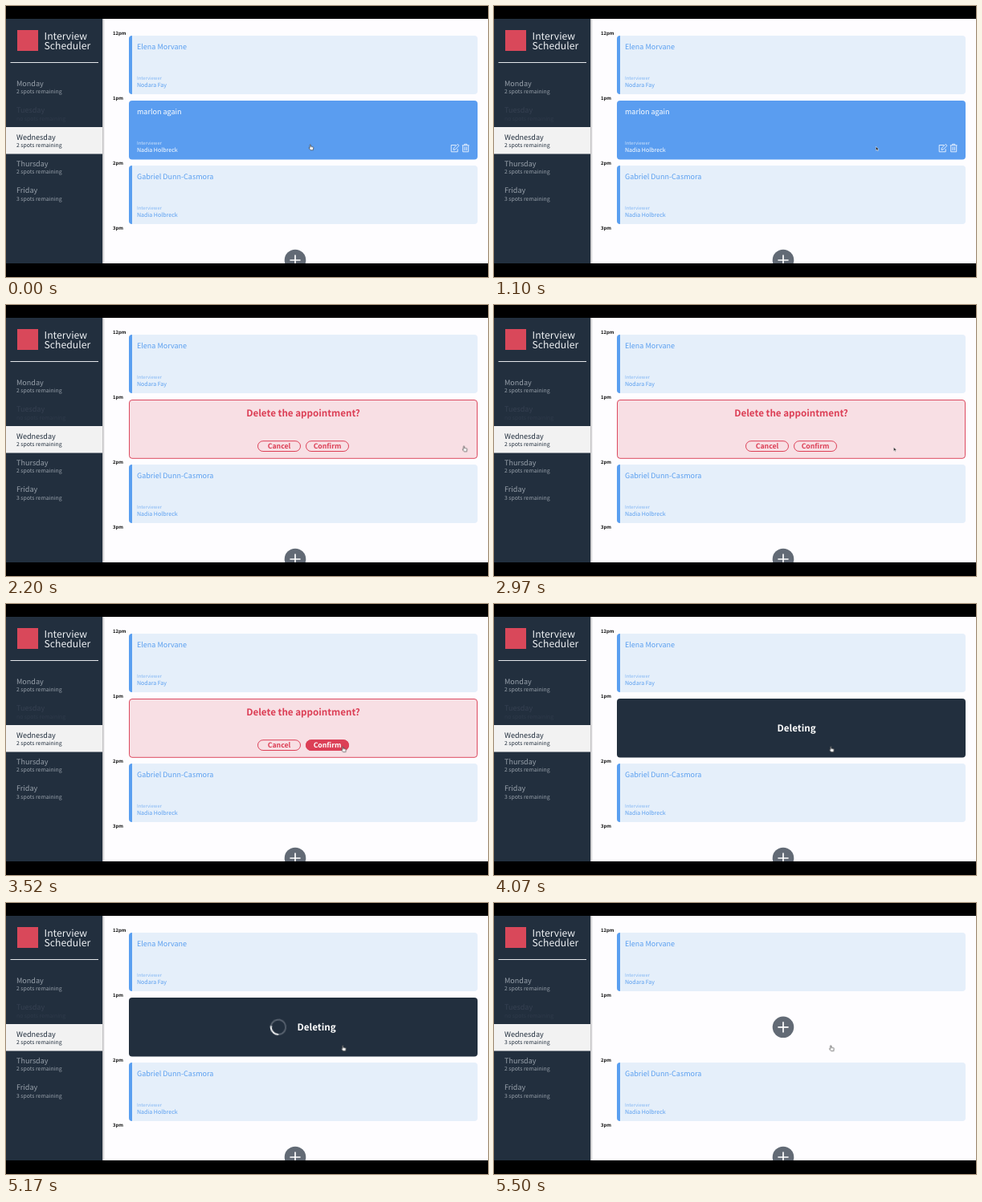
An HTML page for the animation above (5.61 s loop, 600x338 px).

```html
<!DOCTYPE html>
<html lang="en">
<head>
<meta charset="utf-8">
<title>Interview Scheduler</title>
<style>
  html, body { margin: 0; width: 100%; height: 100%; overflow: hidden; background: #000; }
  svg { display: block; width: 100vw; height: 100vh; }
  text {
    font-family: "Noto Sans CJK JP", "Noto Sans CJK SC", "Noto Sans", sans-serif;
    text-rendering: geometricPrecision;
    white-space: pre;
  }
  .title { font-size: 12.2px; font-weight: 300; fill: #eef1f4; }
  .days { fill: #98a1ab; }
  .day { font-size: 9.05px; }
  .spots { font-size: 6.85px; }
  .full { fill: #364152; }
  .current { fill: #222f3e; }
  .hour { font-size: 5.9px; font-weight: 700; fill: #111; }
  .name { font-size: 9px; }
  .label { font-size: 5.8px; opacity: .7; }
  .host { font-size: 7.04px; }
  .head { font-size: 11.6px; font-weight: 700; }
  .button { font-size: 8.7px; font-weight: 700; }
  .mid { text-anchor: middle; }
  .blue { fill: #5a9ff0; }
  .white { fill: #fff; }
  .red { fill: #dc3f56; }

  /* one loop is 51 ticks of 110 ms */
  .anim { animation: 5610ms step-end infinite; }
  .booked { animation-name: booked; }
  .confirm { animation-name: confirm; }
  .hover { animation-name: hover; }
  .deleting { animation-name: deleting; }
  .bare { animation-name: bare; }
  .loading { animation-name: loading; }
  .empty { animation-name: empty; }
  .before { animation-name: before; }
  .hand { animation-name: hand; }
  .arrow { animation-name: arrow; }
  .spin {
    transform-origin: 339px 154.8px;
    animation: spin 5610ms steps(51) infinite;
  }
  .cursor { animation: move 5610ms infinite; }

  @keyframes booked { 0% { visibility: visible } 35.29%, 100% { visibility: hidden } }
  @keyframes confirm { 0% { visibility: hidden } 35.29% { visibility: visible } 72.54%, 100% { visibility: hidden } }
  @keyframes hover { 0% { visibility: hidden } 56.86% { visibility: visible } 72.54%, 100% { visibility: hidden } }
  @keyframes deleting { 0% { visibility: hidden } 72.54% { visibility: visible } 94.11%, 100% { visibility: hidden } }
  @keyframes bare { 0% { visibility: hidden } 72.54% { visibility: visible } 74.5%, 100% { visibility: hidden } }
  @keyframes loading { 0% { visibility: hidden } 74.5% { visibility: visible } 94.11%, 100% { visibility: hidden } }
  @keyframes empty { 0% { visibility: hidden } 94.11%, 100% { visibility: visible } }
  @keyframes before { 0% { visibility: visible } 94.11%, 100% { visibility: hidden } }
  @keyframes hand {
    0% { visibility: visible } 1.96% { visibility: hidden }
    31.37% { visibility: visible } 50.98% { visibility: hidden }
    56.86%, 100% { visibility: visible }
  }
  @keyframes arrow {
    0% { visibility: hidden } 1.96% { visibility: visible }
    31.37% { visibility: hidden } 50.98% { visibility: visible }
    56.86%, 100% { visibility: hidden }
  }
  @keyframes spin { to { transform: rotate(2040deg) } }
  @keyframes move {
    0% { transform: translate(380px, 176.3px); animation-timing-function: step-end }
    1.96% { transform: translate(380px, 176.3px); animation-timing-function: steps(4, start) }
    9.8% { transform: translate(430px, 177px); animation-timing-function: step-end }
    13.72% { transform: translate(430px, 177px); animation-timing-function: steps(4, start) }
    21.56% { transform: translate(477px, 178px); animation-timing-function: step-end }
    23.52% { transform: translate(477px, 178px); animation-timing-function: steps(6, start) }
    35.29% { transform: translate(571.2px, 179.4px); animation-timing-function: step-end }
    50.98% { transform: translate(571.2px, 179.4px); animation-timing-function: steps(5, start) }
    60.78% { transform: translate(391px, 181.2px); animation-timing-function: step-end }
    62.74%, 100% { transform: translate(420.5px, 181.2px); animation-timing-function: step-end }
  }
</style>
</head>
<body>
<svg viewBox="0 0 600 338" preserveAspectRatio="none">
  <defs>
    <clipPath id="page"><rect y="16" width="600" height="305"/></clipPath>
    <linearGradient id="shade">
      <stop offset="0" stop-color="#000" stop-opacity=".28"/>
      <stop offset="1" stop-color="#000" stop-opacity="0"/>
    </linearGradient>
    <g id="card">
      <rect width="434" height="73" rx="4" fill="#e5effa"/>
      <path d="M4 0V73A4 4 0 0 1 0 69V4A4 4 0 0 1 4 0Z" fill="#5a9ff0"/>
    </g>
    <g id="add">
      <circle r="13.3" fill="#626a75"/>
      <path d="M-6.6 0H6.6M0-6.6V6.6" stroke="#fff" stroke-width="1.7"/>
    </g>
  </defs>

  <g clip-path="url(#page)">
    <rect y="16" width="600" height="305" fill="#fefdff"/>
    <rect x="120" y="16" width="3" height="305" fill="url(#shade)"/>
    <rect y="16" width="120" height="305" fill="#222f3e"/>

    <rect x="14" y="30" width="26" height="26" fill="#d9485a"/>
    <text class="title" x="47.6" y="42.2">Interview</text>
    <text class="title" x="47.6" y="54.2">Scheduler</text>
    <path d="M5.5 70.5H115" stroke="#e4e7ea"/>

    <rect y="151" width="120" height="33.5" fill="#f2f2f2"/>
    <g class="days">
      <text class="day" x="13" y="100.1">Monday</text>
      <text class="spots" x="13" y="109.1">2 spots remaining</text>
      <g class="full">
        <text class="day" x="13" y="133.4">Tuesday</text>
        <text class="spots" x="13" y="142.5" opacity=".6">no spots remaining</text>
      </g>
      <g class="current">
        <text class="day" x="13" y="166.6">Wednesday</text>
        <text class="spots anim before" x="13" y="176">2 spots remaining</text>
        <text class="spots anim empty" x="13" y="176">3 spots remaining</text>
      </g>
      <text class="day" x="13" y="200">Thursday</text>
      <text class="spots" x="13" y="209.3">2 spots remaining</text>
      <text class="day" x="13" y="233.3">Friday</text>
      <text class="spots" x="13" y="242.6">3 spots remaining</text>
    </g>

    <text class="hour" x="133" y="35.8">12pm</text>
    <text class="hour" x="133" y="116.6">1pm</text>
    <text class="hour" x="133" y="197.8">2pm</text>
    <text class="hour" x="133" y="278.8">3pm</text>

    <use href="#card" x="153" y="37"/>
    <g class="blue">
      <text class="name" x="163" y="54.3">Elena Morvane</text>
      <text class="label" x="163" y="92">Interviewer</text>
      <text class="host" x="163" y="100.7">Nodara Fay</text>
    </g>

    <use href="#card" x="153" y="199"/>
    <g class="blue">
      <text class="name" x="163" y="216.3">Gabriel Dunn-Casmora</text>
      <text class="label" x="163" y="254">Interviewer</text>
      <text class="host" x="163" y="262.6">Nadia Holbreck</text>
    </g>

    <g class="anim booked">
      <rect x="153" y="118" width="434" height="73.5" rx="4" fill="#5a9df0"/>
      <g class="white">
        <text class="name" x="163" y="135.3">marlon again</text>
        <text class="label" x="163" y="173">Interviewer</text>
        <text class="host" x="163" y="181.6">Nadia Holbreck</text>
      </g>
      <g fill="none" stroke="#fff" stroke-width=".9" stroke-linejoin="round" opacity=".9">
        <path d="M560 173.5H554.2V181.8H562.2V178.3"/>
        <path d="M557 179.4L557.4 177.2 562.2 172.4 564 174.2 559.2 179Z"/>
        <path d="M567.8 173.8H576.6M570.6 173.6V172.3H573.8V173.6M568.7 174V181.8H575.7V174"/>
        <path d="M570.7 175.6V180.2M572.2 175.6V180.2M573.7 175.6V180.2" stroke-width=".7"/>
      </g>
    </g>

    <g class="anim confirm">
      <rect x="153.5" y="118.5" width="433" height="72.8" rx="3.5" fill="#f8dfe4" stroke="#dc4a60"/>
      <text class="head red mid" x="370" y="138.8">Delete the appointment?</text>
      <g fill="none" stroke="#dc3f56">
        <rect x="313.5" y="169.7" width="53" height="12.8" rx="6.4"/>
        <rect x="373.5" y="169.7" width="53" height="12.8" rx="6.4"/>
      </g>
      <text class="button red mid" x="340" y="179.4">Cancel</text>
      <text class="button red mid" x="400" y="179.4">Confirm</text>
    </g>
    <g class="anim hover">
      <rect x="373" y="169.2" width="54" height="13.8" rx="6.9" class="red"/>
      <text class="button white mid" x="400" y="179.4">Confirm</text>
    </g>

    <g class="anim deleting">
      <rect x="153" y="118" width="434" height="73.5" rx="4" fill="#222f3e"/>
    </g>
    <text class="head white mid anim bare" x="376.6" y="159.1">Deleting</text>
    <g class="anim loading">
      <text class="head white mid" x="386.6" y="159.1">Deleting</text>
      <g class="spin" fill="none" stroke-width="1.9">
        <circle cx="339" cy="154.8" r="9.2" stroke="#596370"/>
        <circle cx="339" cy="154.8" r="9.2" stroke="#f4f5f6" pathLength="360"
          stroke-dasharray="100 260" stroke-dashoffset="-10"/>
      </g>
    </g>

    <g class="anim empty"><use href="#add" x="360" y="154.8"/></g>
    <use href="#add" x="360" y="317"/>

    <g class="cursor">
      <path class="anim hand" fill="#fff" stroke="#222" stroke-width=".6" stroke-linejoin="round"
        d="M-1.8 0V-2.8A.6.6 0 0 1-.6-2.8V-1L2-.5Q2.9-.3 2.8.6L2.4 2.6V3.3H-1L-3 .9Q-2.8-.1-1.8.7Z"/>
      <path class="anim arrow" fill="#111" stroke="#fff" stroke-width=".5" stroke-linejoin="round"
        d="M-1.6-2.8V2.2L-.4 1.1 .5 3 1.2 2.7 .4 .9H2Z"/>
    </g>
  </g>
</svg>
</body>
</html>
```
